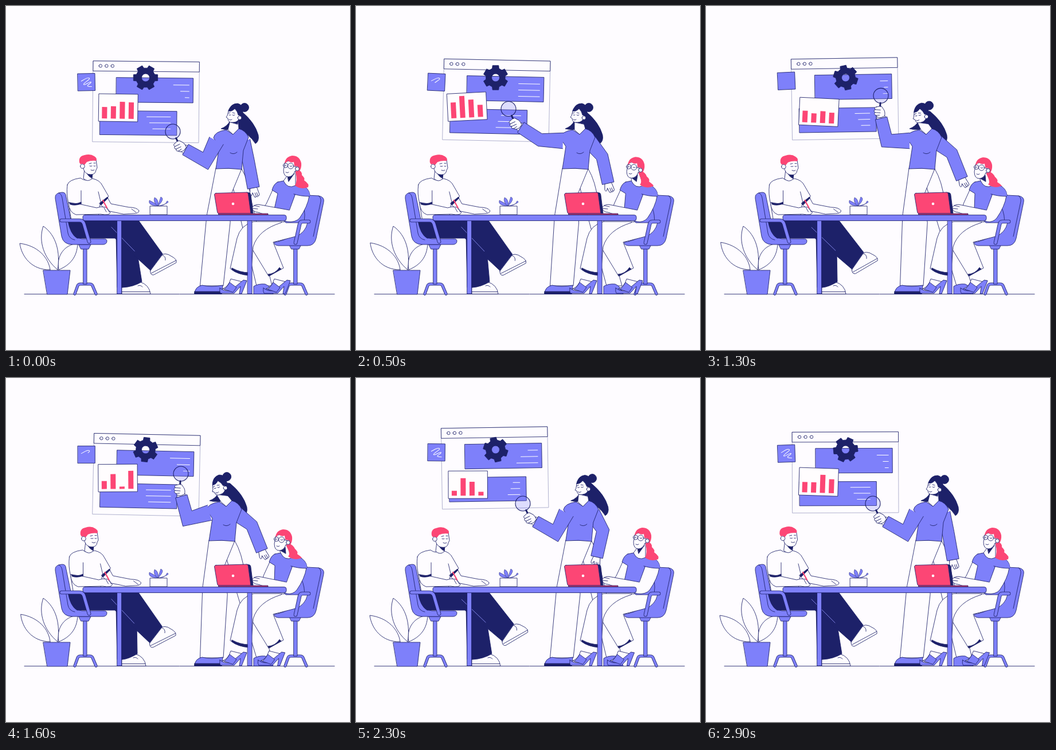
An HTML page with a canvas for the animation above (3000 ms loop, 600 by 600 pixels).

```html
<!DOCTYPE html>
<html lang="en">
<head>
<meta charset="utf-8">
<title>Team meeting</title>
<style>
html, body { margin: 0; width: 100%; height: 100%; overflow: hidden; background: #fefcff; }
canvas { display: block; width: 600px; height: 600px; }
</style>
</head>
<body>
<canvas id="stage" width="600" height="600"></canvas>
<script>
const c = document.getElementById('stage').getContext('2d');
const BG = '#fefcff', BLUE = '#7e80fa', NAVY = '#1d2169', PINK = '#fc4675';
const LOOP = 3000, STEP = 100;
let now = 0;

// Motion rules: an eased step, a step up and back, and a steady swing
function ease(from, to) {
  const u = Math.min(1, Math.max(0, (now - from) / (to - from)));
  return u * u * (3 - 2 * u);
}
const pulse = (a, b, d, e) => ease(a, b) - ease(d, e);
const wave = (peak, period = LOOP / 2) => Math.cos(2 * Math.PI * (now - peak) / period);

// Vectors
const mix = (a, b, u) => [a[0] + (b[0] - a[0]) * u, a[1] + (b[1] - a[1]) * u];
const add = (a, b, s = 1) => [a[0] + b[0] * s, a[1] + b[1] * s];
const unit = (a, b) => {
  const d = Math.hypot(b[0] - a[0], b[1] - a[1]);
  return [(b[0] - a[0]) / d, (b[1] - a[1]) / d];
};
const normal = v => [-v[1], v[0]];
const degrees = v => Math.atan2(v[1], v[0]) * 180 / Math.PI;

// Drawing helpers
function shape(d, fill, stroke = NAVY, width = .85) {
  const p = new Path2D(d);
  if (fill) { c.fillStyle = fill; c.fill(p, 'evenodd'); }
  if (stroke) { c.strokeStyle = stroke; c.lineWidth = width; c.stroke(p); }
}
const line = (d, color, width) => shape(d, null, color, width);
const box = (x, y, w, h, fill, stroke) => shape(`M${x},${y}h${w}v${h}h${-w}z`, fill, stroke);
const disc = (x, y, r, fill, stroke, width) =>
  shape(`M${x - r},${y}a${r},${r} 0 1 0 ${2 * r},0a${r},${r} 0 1 0 ${-2 * r},0z`, fill, stroke, width);
function tube(d, width) {
  line(d, NAVY, width + 1.6);
  line(d, BLUE, width);
}
function at(x, y, deg, draw) {
  c.save();
  c.translate(x, y);
  c.rotate(deg * Math.PI / 180);
  draw();
  c.restore();
}
const turned = (x, y, deg, draw) => at(x, y, deg, () => { c.translate(-x, -y); draw(); });
const moved = (x, y, draw) => at(x, y, 0, draw);

// Two-bone arm: finds the elbow, and the sleeve outline around it
function arm(shoulder, hand, upper, lower, bend, width) {
  const reach = Math.hypot(hand[0] - shoulder[0], hand[1] - shoulder[1]);
  const d = Math.min(reach, upper + lower - .1);
  const along = (d * d + upper * upper - lower * lower) / (2 * d);
  const side = Math.sqrt(Math.max(0, upper * upper - along * along));
  const dir = unit(shoulder, hand);
  const elbow = add(add(shoulder, dir, along), normal(dir), bend * side);
  const a = normal(unit(shoulder, elbow)), fore = unit(elbow, hand), b = normal(fore);
  const m = unit([0, 0], add(a, b));
  const miter = Math.min(16, width / (m[0] * a[0] + m[1] * a[1]));
  const cuff = mix(elbow, hand, .79);
  const edge = s => [add(shoulder, a, s * width * 1.25), add(elbow, m, s * miter), add(cuff, b, s * 10.5)];
  return { cuff, fore, left: edge(-1), right: edge(1) };
}
const sleeve = s => shape(`M${s.left.join('L')}L${[...s.right].reverse().join('L')}`, BLUE);

function windowPane() {
  const sway = wave(300);
  at(243.5 + 2.3 * sway, 162.5 + 7 * wave(200), 1.8 * sway, () => {
    box(-92.5, -70.5, 185, 141, BG, '#a3a5c6');
    box(-92.5, -70.5, 185, 17.5, BG);
    for (const x of [-80, -69.5, -59]) disc(x, -62, 2.7, null);
    box(-52, -42, 134, 43, BLUE);
    box(-80, 16, 134, 42, BLUE);
    for (let i = 0; i < 3; i++) {
      const top = Math.min(37, 24 + 18 * wave(330 + 170 * i));
      const low = Math.min(43, 28 + 20 * wave(200 + 70 * i));
      line(`M75,${-30 + 11 * i}h${-top}`, '#fff', 1);
      line(`M43,${26 + 10.5 * i}h${-low}`, '#fff', 1);
    }
  });
}

function gear() {
  const corner = (r, deg) => [r * Math.cos(deg * Math.PI / 180), r * Math.sin(deg * Math.PI / 180)];
  at(243.5, 125, now / LOOP * 180, () => {
    const rim = [];
    for (let a = 0; a < 360; a += 60)
      rim.push(corner(17, a - 20), corner(21.8, a - 14), corner(21.8, a + 14), corner(17, a + 20));
    shape(`M${rim.join('L')}zM-7,0a7,7 0 1 0 14,0a7,7 0 1 0 -14,0z`, NAVY);
  });
}

function note() {
  at(140.3, 131.5 + 2.6 * wave(250), 2.7 * wave(480), () => {
    box(-15, -15, 30, 30, BLUE);
    const shown = 1 - pulse(100, 800, 1400, 1950);
    if (shown < .01) return;
    c.setLineDash([68 * shown, 200]);
    line('M-9,-2C-4,-4 1,-9 5,-7C8,-5 -5,1 -5,4C-3,6 5,-1 8,0C9,2 0,5 2,7Q5,8 9,8', '#fff', 1);
    c.setLineDash([]);
  });
}

function chart() {
  const sway = wave(1190);
  const bars = [
    18 + 10 * wave(650, LOOP),
    27 + 11 * wave(500),
    24 + 13 * wave(300, LOOP) + 10 * wave(1000),
    18.5 + 13.5 * wave(170)
  ];
  at(195.5 + 1.7 * sway, 181 + 9 * wave(1030), 3 * sway, () => {
    box(-34, -24, 68, 48, '#fffdfe');
    bars.forEach((h, i) => box(-28.5 + 15.5 * i, 19 - h, 9, h, PINK, null));
  });
}

function plant(lean) {
  turned(77, 460, 2 * lean, () => shape('M77,460C45,461 27,437 24,414C55,418 74,438 77,460z', BG));
  shape('M92,460C87,436 102,416 125,414C124,438 112,452 92,460z', BG);
  shape('M90,460C66,440 56,410 65,384C88,400 95,430 90,460z', BG);
  shape('M65,461H112L107,503H72z', BLUE);
}

function chairBase(x) {
  tube(`M${x - 18},502L${x - 13},488Q${x - 12},485 ${x - 8},485H${x + 8}Q${x + 12},485 ${x + 13},488L${x + 19},502`, 3.6);
  box(x - 3, 420, 6, 65, BLUE);
  shape(`M${x - 11},416H${x + 10}L${x + 6},424H${x - 7}z`, BLUE);
}
function leftChair() {
  chairBase(138);
  shape('M92,326Q85,328 86,336L97,402Q100,416 116,416H170Q176,415 176,410Q176,406 170,406H132Q120,404 117,392L104,329Q103,325 98,325z', BLUE);
  line('M92,326Q97,328 98,335L108,396Q110,406 120,408');
}
function rightChair() {
  chairBase(505);
  shape('M525,330L545,331Q556,333 554,342L541,405Q538,418 526,418H475Q467,417 468,412Q484,410 500,400L512,340Q514,331 525,330z', BLUE);
  line('M545,331Q550,334 549,341L536,402');
}

function standing(lean) {
  const dx = -12 * lean, X = v => v + dx;
  // legs and shoes
  shape(`M${X(392)},300L437,488H464L${X(428)},340Q${X(424)},306 ${X(411)},284z`, BG);
  shape(`M${X(366)},283L${350 + dx * .6},366L338.5,488H379L${391 + dx * .4},378L${X(392)},330L${X(411)},284z`, BG);
  shape('M329,502Q329,490 342,487Q358,491 378,487L376,502z', BLUE);
  shape('M329,498H377L376,502H329z', NAVY);
  shape('M432,502V489Q440,484 452,485Q462,489 466,502z', BLUE);

  // long hair
  moved(-20 * lean, 0, () =>
    shape('M398,182L391,200Q386,210 375,214Q386,217 400,214Q424,222 435,240Q442,236 440,225Q434,203 411,184z', NAVY));

  // resting arm, drawn behind the torso
  const rest = 17 * pulse(1650, 2000, 2600, 2950);
  const low = arm([X(413), 236], [434 + 17 * lean - rest, 330 - 17 * lean - .3 * rest], 35, 60, -1, 10.5);
  at(low.cuff[0], low.cuff[1], degrees(low.fore) - 90, () => {
    shape('M-6,0L-8,9Q-8,14 -5,12L-3,8L-1,16Q1,18 2,15Q4,18 5,15Q8,16 8,12L6,0z', BG);
    line('M2,15L1,9M5,15L4,9');
  });
  sleeve(low);

  // torso
  moved(dx, 0, () => {
    shape('M384,216L396,224L406,214Q418,217 423,229L414,252L411,285Q388,282 366,284L372,245L362,230Q364,219 384,216z', BLUE);
    line('M391,256q6,4 12,-1');
  });

  // neck and head
  const nod = pulse(1000, 1500, 2000, 2500);
  const fx = -20 * lean - 6 * nod, F = v => v + fx;
  shape(`M${F(391)},200L${X(387)},216L${X(396)},224L${X(406)},214L${F(405)},196z`, BG);
  shape(`M${F(393)},203Q${F(402)},203 ${F(405)},197L${X(404)},206z`, NAVY);
  at(F(398), 190, -18 * nod, () => {
    c.translate(-398, -190);
    shape('M389,180L386,191L384,194L387,196Q387,204 396,203Q404,203 407,196L411,182L398,174z', BG);
    shape('M388,183Q392,170 404,170Q414,172 413,186L410,192L405,190Q404,184 399,179Q393,185 388,183z', NAVY);
    disc(416, 177, 7.5, NAVY);
    disc(407.5, 195, 3.3, BG);
    line('M388,187l3,-1M395,186l4,1M389,190q2,1 3,0M395,190q2,2 4,0M389,198q3,2 5,0');
  });

  // pointing arm and magnifier
  const up = ease(150, 850), down = ease(1600, 2200), reach = up - down;
  const arc = 4 * reach * (1 - reach);
  const lens = [291 + 14 * reach - 32 * arc, 219 - 79 * up + 27 * ease(900, 1600) + 52 * down];
  const tilt = (26 - 30 * reach + 14 * arc) * Math.PI / 180;
  const stick = [Math.sin(tilt), Math.cos(tilt)];
  const hand = add(lens, stick, 29);
  const high = arm([X(367), 235], hand, 40, 51, -1, 11);
  disc(...lens, 13, 'rgba(126,128,250,.25)', NAVY, 1.1);
  line(`M${add(lens, stick, 13)}L${hand}`, NAVY, 3);
  const grip = s => add(hand, normal(high.fore), s * 5);
  shape(`M${mix(high.cuff, high.left[2], .75)}L${grip(-1)}L${grip(1)}L${mix(high.cuff, high.right[2], .75)}z`, BG);
  at(hand[0], hand[1], -tilt * 180 / Math.PI, () => {
    shape('M-6,-9Q-11,-8 -8,-4Q-12,-2 -8,1Q-11,4 -6,6Q-4,10 3,9L9,6Q10,-2 6,-6L3,-10Q-1,-11 -6,-9z', BG);
    line('M-8,-4L1,-4M-8,1L1,1M-6,6L0,5');
  });
  sleeve(high);
}

function man(lean) {
  const back = -8 * lean;
  // standing foot and far leg
  shape(`M202,502V489Q${218 + back},491 ${233 + back},481Q${250 + back},486 ${252 + back},502z`, BG);
  line(`M202,498.5H${251 + back}M${230 + back},488q5,-2 8,2`);
  shape(`M188,380L192,402L194,491H203Q${222 + back},490 ${237 + back},481L228,425L215,395z`, NAVY);
  // crossed leg
  shape('M108,374H229L240,388L215,425L190,405H124Q112,398 108,374z', NAVY);
  turned(195, 380, -2.4 * wave(1030), () => {
    c.translate(1, 0);
    shape('M252,461L273,432Q277,430 283,432L292,437Q298,441 297,446L258,468Q252,469 252,461z', BG);
    line('M254,465L297,442M272,433q7,2 6,9');
    shape('M180,376L229,372L273,431L252,460L190,405z', NAVY);
    line('M183,386L224,427', '#8f92f8');
  });

  // arms and shirt
  moved(3.5 * lean, 0, () => {
    shape('M164,345L177,334L183,345L214,351Q228,351 232,357Q232,362 222,362L205,363L176,357z', BG);
    line('M219,354L227,360');
    shape('M107,312Q109,303 130,300Q138,307 151,301Q164,304 168,313L179,332L164,346L160,374H114L109,344Q105,328 107,312z', BG);
    line('M131,322V346M161,324L166,345');
    shape('M109,343Q110,360 122,364L165,363Q181,366 182,360L174,351Q165,349 158,352L131,346z', BG);
    shape('M111,343Q120,347 131,342V345Q120,349 112,346z', NAVY);
    shape('M163,344L177,333L178,335L166,347z', NAVY);
    line('M169,339L176,352', PINK, 2.2);
    line('M171,352l4,7M177,353l3,6');
  });

  // head
  const dx = 2 * lean + 4 * pulse(1600, 2000, 2600, 3000);
  moved(dx, dx * .35, () => {
    shape('M137,284L135,301Q143,308 150,301L150,288z', BG);
    shape('M140,290Q147,295 151,293L150,300Q144,298 140,290z', NAVY);
    shape('M136,270L135,284Q138,294 148,294Q156,294 157,286L159,282L157,268z', BG);
    disc(133.5, 279.5, 3.8, BG);
    shape('M128,273Q126,262 137,260Q147,257 154,262Q160,266 157,270Q148,269 141,272L137,277L133,275L130,276z', PINK, null);
    line('M145,275l4,-1M153,274l3,0M146,279q2,1 4,0M153,279q2,1 3,0M148,286q3,2 6,0');
  });
}

function sandal(x, y) {
  moved(x, y, () => {
    shape('M4,-9Q14,-12 18,-26L38,-21L41,-24L24,-5z', BG);
    shape('M-1,-10L6,-6Q16,-3 22,-9L40,-24L46,-23L37,0H33L35,-13L24,-1H0Q-2,-4 -1,-10z', BLUE);
    shape('M7,-8Q13,-14 16,-20L28,-11L22,-3z', BLUE);
  });
}

function seated(lean) {
  // legs
  sandal(446 + 8 * wave(500, LOOP), 502);
  sandal(374, 502);
  shape('M524,374L460,378Q432,388 430,425L458,471L484,457L466,412L505,402Q522,396 526,378z', BG);
  shape('M457,468Q470,467 477,456L480,459L459,471z', NAVY);
  shape('M480,376H432Q409,382 403,405L391,458Q406,470 427,468L431,420Q440,390 480,378z', BG);
  shape('M394,457Q409,465 424,465L423,470Q404,468 394,460z', NAVY);

  const b = -5 * lean, h = -16 * lean, y = 3 * lean;
  const B = v => v + b, H = v => v + h;
  // torso and arms
  shape(`M${B(465)},321L${B(454)},345L448,353L470,360L${B(476)},326z`, BG);
  shape(`M${B(474)},307L${B(484)},305L${B(505)},313L${B(516)},312Q${B(529)},318 ${B(530)},330L${B(520)},350Q522,366 520,378H488L468,354L${B(474)},327L${B(464)},321Q${B(467)},310 ${B(474)},307z`, BLUE);
  shape(`M${B(505)},328L${B(529)},331Q${B(526)},350 ${B(512)},370Q${B(505)},378 490,376L440,360Q430,359 429,352Q434,344 445,347L${B(494)},356z`, BG);
  line('M430,353l9,1M433,348l9,2');
  shape(`M${B(502)},328Q${B(500)},316 ${B(512)},313Q${B(530)},317 ${B(530)},332Q${B(514)},332 ${B(502)},328z`, BLUE, null);
  line(`M${B(502)},328Q${B(514)},332 ${B(529)},332`);

  // neck, hair, face
  shape(`M${H(492)},${294 + y}L${B(484)},305Q${B(491)},320 ${B(505)},313L${H(505)},${288 + y}z`, BG);
  shape(`M${H(491)},${296 + y}Q${H(498)},${300 + y} ${H(503)},${292 + y}L${B(493)},306z`, NAVY);
  moved(h, y, () => {
    const s = 4 * lean, t = -5 * lean;
    shape(`M507,284Q517,288 ${516 + s},295Q${522 + s},300 ${520 + s},304Q${530 + s},311 ${527 + s},${316 + t}Q${514 + s},${321 + t} ${504 + s},${313 + t}Q${509 + s},305 505,290z`, PINK, null);
    shape('M487,272L484,286Q484,298 493,298Q501,297 504,288L510,284L507,268z', BG);
    shape('M486,275Q487,263 499,261Q512,261 515,274Q516,283 511,289L509,280L503,279L502,272Q496,274 492,270L486,275z', PINK, null);
    disc(508, 284, 3.4, BG);
    disc(496.5, 279, 5, null);
    disc(487.5, 278, 4, null);
    line('M501,279L507,281M495,279q2,2 4,0M486,278q1,1 3,0M488,290q3,2 5,0');
  });
}

function table() {
  box(194, 370, 7.5, 132, BLUE);
  box(421.5, 370, 7.5, 132, BLUE);
  shape('M138,364.5H485Q489,364.5 489,368V371Q489,374.5 485,374.5H138Q134,374.5 134,371V368Q134,364.5 138,364.5z', BLUE);
  // planter
  for (const [x, y] of [[250, 339], [281, 340], [259, 334], [270, 333]])
    shape(`M265,349Q${x - 3},${y + 9} ${x},${y}Q${x + 8},${y + 3} 265,349z`, BLUE, NAVY, .5);
  box(251.5, 349, 29.5, 15, BG);
  // laptop
  shape('M420,325L425,326Q427,327 427,330L431,362H424z', NAVY);
  shape('M366,326.5L420,325Q422,325 422.5,328L427,362H371Q369,362 368.5,359L363.5,329Q363.5,327 366,326.5z', PINK);
  shape('M371,362H457V364H371z', PINK);
  disc(396, 345, 2.3, '#fff', null);
}

function draw() {
  c.fillStyle = BG;
  c.fillRect(0, 0, 600, 600);
  const lean = pulse(150, 850, 1650, 2350);
  windowPane();
  gear();
  note();
  chart();
  line('M32,502.5H573');
  standing(lean);
  plant(lean);
  leftChair();
  rightChair();
  man(lean);
  tube('M97,374H128Q134,374 136,380L145,411', 5);
  seated(pulse(100, 700, 1650, 2300));
  tube('M528,376H517Q513,376 512,381L505,413', 5);
  table();
}

c.lineJoin = c.lineCap = 'round';
function tick() {
  now = Math.floor(performance.now() % LOOP / STEP) * STEP;
  draw();
  requestAnimationFrame(tick);
}
tick();
</script>
</body>
</html>
```
